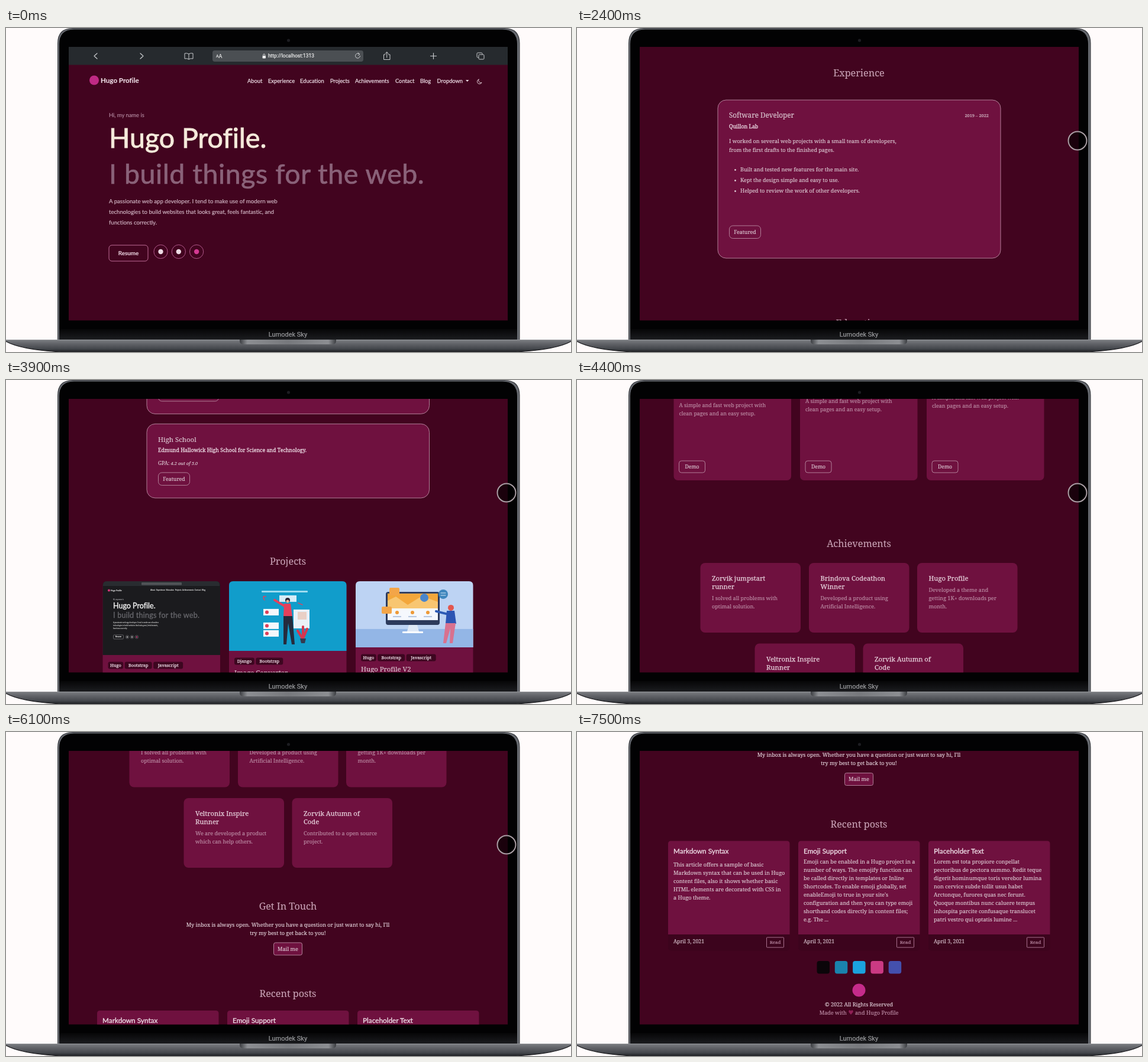
These frames come from a looping animation (955 by 549 pixels, 8400 ms). An HTML page:

```html
<!DOCTYPE html>
<html lang="en">
<head>
<meta charset="utf-8">
<title>Portfolio page on a laptop</title>
<style>
html, body { margin: 0; width: 100%; height: 100%; overflow: hidden; background: #fffbfb; }
svg { display: block; width: 100%; height: 100%; }
text { white-space: pre; font-variant-ligatures: none; }
.serif { font-family: "Noto Serif", serif; }
.sans { font-family: Lato, sans-serif; }
.ui { font-family: Roboto, sans-serif; }
</style>
</head>
<body>
<svg id="stage" viewBox="0 0 955 549" xmlns="http://www.w3.org/2000/svg"></svg>
<script>
const BG = '#42041f', CARD = '#6f113f', EDGE = '#b27f98';
const PALE = '#dccad3', SOFT = '#c6a0b3', MUTED = '#bd8ea6', BRIGHT = '#ecdbe4';

// Markup helpers
const attrs = o => Object.entries(o).map(([k, v]) => ` ${k}="${v}"`).join('');
const rect = (x, y, w, h, fill, r = 0, o = {}) =>
  `<rect x="${x}" y="${y}" width="${w}" height="${h}" rx="${r}" fill="${fill}"${attrs(o)}/>`;
const circle = (x, y, r, fill, o = {}) => `<circle cx="${x}" cy="${y}" r="${r}" fill="${fill}"${attrs(o)}/>`;
const path = (d, fill, o = {}) => `<path d="${d}" fill="${fill}"${attrs(o)}/>`;
const line = (d, color, w = 1) =>
  path(d, 'none', { stroke: color, 'stroke-width': w, 'stroke-linecap': 'round', 'stroke-linejoin': 'round' });
const shift = (y, ...parts) => `<g transform="translate(0 ${y})">${parts.join('')}</g>`;

// y is the optical middle of the text
const firm = (color, w = .3) => ({ stroke: color, 'stroke-width': w });
const text = (x, y, s, size, fill = PALE, o = {}) => {
  const style = { class: 'serif', x, y: (y + size * .35).toFixed(2), 'font-size': size, fill, ...firm(fill, .15), ...o };
  return `<text${attrs(style)}>${s}</text>`;
};
const mid = { 'text-anchor': 'middle' }, end = { 'text-anchor': 'end' };
const lines = (x, y, gap, list, size, fill, o) => list.map((s, i) => text(x, y + i * gap, s, size, fill, o)).join('');
const sans = (x, y, s, size, fill, o = {}) => text(x, y, s, size, fill, { class: 'sans', ...o });
const ui = (x, y, s, size, fill, o = {}) => text(x, y, s, size, fill, { class: 'ui', ...o });
const heading = (y, s) => text(476.5, y, s, 16.2, SOFT, mid);
const bullet = (x, y, s, o) => circle(x - 8.5, y + .5, 1.4, PALE) + text(x, y, s, 9, PALE, o);
const panel = (x, y, w, h, r = 14) => rect(x, y, w, h, CARD, r, { stroke: EDGE });
const button = (x, y, w, h, s, size, r = 6, fill = 'none') =>
  rect(x, y, w, h, fill, r, { stroke: EDGE }) + text(x + w / 2, y + h / 2, s, size, PALE, mid);

function toolbar() {
  const c = '#c9cbce';
  return rect(106, 32, 742, 30.5, '#262a2e') + rect(349, 38, 255, 19, '#4b4f53', 4) +
    line('M154 43l-5 4.5 5 4.5M227 43l5 4.5-5 4.5', c, 1.2) +
    line('M309 44q-3-2-7-1v9q4-1 7 1 3-2 7-1v-9q-4-1-7 1v9', c) +
    ui(355, 48, 'A', 7, '#eee') + ui(359.5, 47.5, 'A', 9, '#eee') +
    rect(433.5, 47, 5.5, 4.5, '#eee', 1) + line('M434.7 47v-1.4a1.5 1.5 0 0 1 3 0v1.4', '#eee', .9) +
    ui(443, 47.5, 'http://localhost:1313', 8.4, '#f2f2f2', firm('#f2f2f2', .2)) +
    line('M597.5 44.5a4 4 0 1 0 1 3M595 42l3 2.4-2.6 2.2', c) +
    line('M641 45h-2.5v8.5h10.5v-8.5h-2.5M643.7 50v-9M641 43.5l2.7-2.7 2.7 2.7', c) +
    line('M717.5 47.5h10M722.5 42.5v10', c, 1.2) +
    rect(796, 42, 9, 8, 'none', 1.5, { stroke: c }) + rect(799, 45, 9, 8, '#262a2e', 1.5, { stroke: c });
}

function hero() {
  const nav = { About: 408, Experience: 443, Education: 497, Projects: 548, Achievements: 590, Contact: 658, Blog: 700, Dropdown: 728.5 };
  const menu = Object.entries(nav).map(([s, x]) => sans(x, 89.5, s, 9.3, BRIGHT, firm(BRIGHT, .25))).join('');
  const social = [BRIGHT, BRIGHT, '#d33a93'].map((c, i) =>
    circle(261.5 + i * 30.3, 379, 11.6, 'none', { stroke: '#b0578a' }) + circle(261.5 + i * 30.3, 379, 4.2, c)).join('');
  return toolbar() + circle(149, 88.5, 8, '#c02a85') +
    sans(160, 88.5, 'Hugo Profile', 11.6, BRIGHT, { 'font-weight': 700 }) + menu +
    path('M777 88h5.5l-2.75 3z', BRIGHT) +
    line('M799 87a4 4 0 1 0 5 5.5a4 4 0 0 1-5-5.5', BRIGHT, .9) +
    sans(174, 147.5, 'Hi, my name is', 9.4, '#b58ca2') +
    sans(174, 187, 'Hugo Profile.', 46.5, '#f5eadb', firm('#f5eadb', .9)) +
    sans(174, 247.5, 'I build things for the web.', 46.5, '#8a6279', { ...firm('#8a6279', .7), 'letter-spacing': .55 }) +
    lines(174, 293.5, 18.2, ['A passionate web app developer. I tend to make use of modern web',
      'technologies to build websites that looks great, feels fantastic, and', 'functions correctly.'],
      9.65, '#cfb3c1', { class: 'sans', ...firm('#cfb3c1', .2) }) +
    rect(174, 368, 66, 27, BG, 5, { stroke: '#c06d98' }) +
    sans(207, 381.5, 'Resume', 9.8, '#e4ccd8', { ...mid, 'font-weight': 700 }) + social;
}

function avatar() {
  return `<clipPath id="face"><circle cx="637" cy="230.5" r="72"/></clipPath>` +
    circle(637, 230.5, 72.3, '#abdce6') + '<g clip-path="url(#face)">' +
    path('M637 191C619 189 613 201 612 212C611 222 602 226 604 236C606 243 599 248 601 257C603 268 612 270 620 271H655C667 271 675 263 674 253C673 246 669 243 671 236C673 226 663 222 662 211C660 197 652 190 637 191Z', '#481b1d') +
    path('M596 305q1-34 18-38l15-6h17l16 6q16 4 17 38z', '#e4233f') +
    path('M628 252h19v17l-9 9-10-9z', '#dba27b') +
    path('M627 275h20l-3 30h-13z', '#fff') +
    path('M629 262l-5 10 8 33h-4l-10-31zM646 262l5 10-7 33h4l9-31z', '#bd1732') +
    path('M637 210q-8 10-15 16q-1 24 15 32z', '#f5c6a0') + path('M637 210q8 10 17 16q0 24-17 32z', '#e3ad86') + '</g>';
}

function about() {
  const tech = ['HTML', 'CSS', 'JavaScript', 'React', 'Node', 'Express'].map((s, i) => {
    const x = i % 2 ? 349 : 227, y = 307 + (i >> 1) * 21.6;
    return path(`M${x - 9} ${y - 1.8}l3.6 2-3.6 2z`, PALE) + text(x, y, s, 9);
  }).join('');
  return heading(116, 'About Me') +
    lines(216, 167, 15.6, ['I am a software developer with a passion for web development. I have a',
      'background in computer science and mathematics, and I have a strong',
      'interest in the intersection of technology and art. I am currently',
      'working as a software developer at <tspan fill="#f3e8ed" stroke="#f3e8ed" stroke-width=".3">quillon lab</tspan>. in San Francisco, CA.'], 9) +
    lines(216, 239.5, 15.8, ['I am currently working on a project that will be used to help people', 'find the best way to get around the city.'], 9) +
    text(216, 280.5, "Here are a few technologies I've been working with recently:", 9) + tech + avatar();
}

function experience() {
  return heading(456, 'Experience') + panel(238, 502, 478, 268) +
    text(257, 528, 'Software Developer', 11.7) + text(696, 528, '2019 – 2022', 7.4, PALE, end) +
    text(257, 547, 'Quillon Lab', 8.8, BRIGHT, firm(BRIGHT)) +
    lines(257, 572, 15, ['I worked on several web projects with a small team of developers,', 'from the first drafts to the finished pages.'], 9) +
    ['Built and tested new features for the main site.', 'Kept the design simple and easy to use.', 'Helped to review the work of other developers.']
      .map((s, i) => bullet(276, 620 + i * 18, s)).join('') +
    button(257.5, 715, 53, 21.5, 'Featured', 8.8) + heading(880, 'Education');
}

const gpa = (y, n) => text(257, y, `GPA: <tspan font-size="7.7" font-style="italic">${n} out of 5.0</tspan>`, 8.5);
const school = (y, title, place, dates) => text(257, y, title, 11.7) +
  text(257, y + 19, place, 8.8, BRIGHT, firm(BRIGHT)) + text(696, y + 1, dates, 7.5, PALE, end);
const extras = y => text(257, y, 'Extracurricular Activities', 8.7) +
  bullet(276, y + 23.5, 'Lorem ipsum dolor sit amet consectetur adipisicing elit.') +
  bullet(276, y + 37.5, 'Tempora esse, eaque delectus nulla quo doloribus itaque expedita alias natus optio totam') +
  text(276, y + 51, 'maxime nihil excepturi velit a animi laborum hic similique.', 9);

function education() {
  return panel(238, 64.5, 477.5, 172.5) +
    school(90, 'Master of Business Administration', 'University of California, Berkeley', '2013 – 2015') +
    gpa(130, '3.8') + extras(148.5) +
    panel(238, 254, 477.5, 259.5) +
    school(280.5, 'Bachelor of Science in Computer Science', 'Massachusetts Institute of Technology', '2009 – 2013') +
    gpa(321, '3.9') +
    text(257, 338.5, 'I Publiced two papers in the DRN LUMVIA Conference on Artificial Intelligence.', 8.8) +
    bullet(276, 361.5, 'Calm and Thorough Animal Recognition with a Double Interlocking Neural Lattice', { 'text-decoration': 'underline' }) +
    bullet(276, 375.5, 'Face mask detection using a single convolutional neural network.') +
    extras(398.5) + button(257.5, 471, 102, 21, 'My academic record', 8.8);
}

function tags(x, y, list) {
  return list.map(s => {
    const w = s.length * 4.05 + 9.5, out = rect(x, y - 6, w, 12, '#3d0620', 3) +
      text(x + w / 2, y, s, 7.3, BRIGHT, { ...mid, ...firm(BRIGHT, .25) });
    x += w + 2.5;
    return out;
  }).join('');
}

function project(x, h, art, list, title) {
  const y = 341 + h;
  return rect(x, 341, 198.5, 312, CARD, 7) + art + tags(x + 9, y + 17.5, list) + text(x + 9, y + 37.5, title, 11.3) +
    lines(x + 9, y + 60, 14, ['A simple and fast web project with', 'clean pages and an easy setup.'], 8.9, MUTED) +
    button(x + 9, 620, 44, 20, 'Demo', 8.6, 4);
}
const cover = (x, h, c) => path(`M${x} ${341 + h}v-${h - 7}q0-7 7-7h184.5q7 0 7 7v${h - 7}z`, c);

function artDark() {
  const g = '#8b8b8f';
  return cover(163.5, 125, '#1b1b1e') + path('M164 349v-2q0-6 7-6h184q6 0 6 6v2z', '#292c30') +
    rect(229, 343, 68, 4.5, '#505357', 1) + circle(174, 356.5, 2, '#d33a7a') +
    sans(177, 356.5, 'Hugo Profile', 3.4, '#ddd') +
    sans(244, 356.5, 'About  Experience  Education  Projects  Achievements  Contact  Blog', 3.1, '#ccc') +
    sans(181, 372, 'Hi, my name is', 2.8, g) + sans(181, 383, 'Hugo Profile.', 12.5, '#f2f2f2', firm('#f2f2f2', .4)) +
    sans(181, 399, 'I build things for the web.', 12.5, '#68686d', { ...firm('#68686d'), 'letter-spacing': .25 }) +
    lines(181, 411, 5, ['A passionate web app developer. I tend to make use of modern', 'technologies to build websites that looks great, feels fantastic,', 'functions correctly.'], 2.6, '#aaa') +
    rect(181.5, 432, 17, 7, 'none', 1.5, { stroke: g, 'stroke-width': .6 }) + sans(190, 435.5, 'Resume', 3, '#ddd', mid) +
    ['#bbb', '#bbb', '#d33a7a'].map((c, i) => circle(205 + i * 8, 435.5, 2.7, 'none', firm(g, .5)) + circle(205 + i * 8, 435.5, 1.2, c)).join('');
}

function artBlue() {
  const box = y => rect(435, y, 26, 11, '#f4f7fb') + circle(441, y + 5.5, 3, '#e0405a');
  return cover(377, 118, '#119dcb') + rect(432, 357, 78, 3, '#9ddcf0', 1) +
    rect(462, 365, 29, 11, '#d5ecf7') + rect(486, 389, 27, 32, '#eaf1f8') + rect(493, 393, 15, 13, '#e9cfc5') +
    [388, 411, 424].map(box).join('') +
    line('M472 384L454 373', '#e5405b', 4) + circle(476, 373, 4, '#2a2333') + circle(476, 375, 2.5, '#f1b89b') +
    path('M470 379h11l3 22h-15z', '#e5405b') + path('M469 400h15l4 48h-5l-6-36-3 36h-5z', '#252b3d') +
    line('M501 438l-8-13M502 438l7-16M502 438v-20', '#d5364f', 4) + path('M497 438h10l-2 8h-6z', '#333a50') +
    line('M437 373q-5-8 2-6M494 378l7 3', '#e5405b', 1.5);
}

function artLight() {
  return cover(591, 112, '#bdd3f3') + rect(591, 422, 198.5, 31, '#93b6e6') +
    rect(642, 359, 91, 56, '#2c3a5c', 4) + rect(645, 362, 85, 45, '#f5f8fd') + rect(645, 362, 85, 25, '#f3a73b') +
    path('M645 387v-13l14-7 20 14 24-15 27 10v11z', '#f8c671') +
    [661, 687, 713].map(x => circle(x, 394, 3, '#ee9a37') + rect(x - 7, 400, 14, 2, '#b3c5df')).join('') +
    path('M681 415h14l3 11h-20z', '#dfe8f5') + rect(670, 426, 35, 3, '#fff', 1) +
    rect(648, 352, 17, 13, '#f3a548', 2) + rect(635, 384, 17, 12, '#f3a548', 2) +
    circle(739, 363, 8, '#3f86bd') + line('M735 361h8M735 365h8', '#d6e9f6') + circle(707, 369, 7, '#4a86cc') +
    line('M747 397l-20-5', '#2d5bb5', 4) + circle(752, 386, 5, '#e2574f') + path('M745 391h13l3 22h-18z', '#2c54b3') +
    path('M743 412h17l-5 34h-5l1-25-7 25h-5z', '#d8718f');
}

function projects() {
  return panel(238, 74.5, 477.5, 125.5) + text(257, 101, 'High School', 11.4) +
    text(257, 119.5, 'Edmund Hallowick High School for Science and Technology.', 8.8, BRIGHT, firm(BRIGHT)) +
    gpa(141, '4.2') + button(257.5, 157, 53, 21.5, 'Featured', 8.8) + heading(307, 'Projects') +
    project(163.5, 125, artDark(), ['Hugo', 'Bootstrap', 'Javascript'], 'Hugo Profile') +
    project(377, 118, artBlue(), ['Django', 'Bootstrap'], 'Image Converter') +
    project(591, 112, artLight(), ['Hugo', 'Bootstrap', 'Javascript'], 'Hugo Profile V2');
}

function award(x, y, title, body) {
  const top = y + 12.5 + title.length * 14;
  return rect(x, y, 169.5, 118, CARD, 8) + lines(x + 19.5, y + 26.5, 14, title, 11.2, '#e6d0db', firm('#e6d0db', .25)) +
    lines(x + 19.5, top + 19, 14, body, 9, MUTED);
}

function achievements() {
  return heading(100, 'Achievements') +
    award(208.5, 133, ['Zorvik jumpstart', 'runner'], ['I solved all problems with', 'optimal solution.']) +
    award(392, 133, ['Brindova Codeathon', 'Winner'], ['Developed a product using', 'Artificial Intelligence.']) +
    award(575, 133, ['Hugo Profile'], ['Developed a theme and', 'getting 1K+ downloads per', 'month.']) +
    award(300.5, 269.5, ['Veltronix Inspire', 'Runner'], ['We are developed a product', 'which can help others.']) +
    award(483.5, 269.5, ['Zorvik Autumn of', 'Code'], ['Contributed to a open source', 'project.']);
}

function contact() {
  return heading(295, 'Get In Touch') +
    lines(476.5, 326.5, 14, ["My inbox is always open. Whether you have a question or just want to say hi, I'll", 'try my best to get back to you!'], 9, '#e2d3da', mid) +
    button(452.5, 357, 48, 21, 'Mail me', 9, 3, CARD);
}

function post(x, title, y, body) {
  return rect(x, 184.5, 205.5, 186, '#3c041d', 5) + path(`M${x} 343v-153.5q0-5 5-5h195.5q5 0 5 5v153.5z`, CARD) +
    sans(x + 9, 201.5, title, 11.8, BRIGHT, firm(BRIGHT, .35)) + lines(x + 9, y, 14, body, 9.1) +
    text(x + 9, 354.5, 'April 3, 2021', 8.7) +
    rect(x + 166.5, 348, 29, 17, 'none', 1, { stroke: '#a8718d' }) + text(x + 181, 356.5, 'Read', 7.9, MUTED, mid);
}

function posts() {
  const icons = ['#0b0509', '#1a83ad', '#1ba2de', '#cb3a83', '#4450ae']
    .map((c, i) => rect(405.5 + i * 30.3, 388, 21.5, 21.5, c, 4)).join('');
  const heart = '<tspan font-family="DejaVu Sans, sans-serif" font-size="10.5" fill="#8f1f55" stroke="none">♥</tspan>';
  return heading(156, 'Recent posts') +
    post(154, 'Markdown Syntax', 224.5, ['This article offers a sample of basic', 'Markdown syntax that can be used in Hugo',
      'content files, also it shows whether basic', 'HTML elements are decorated with CSS in', 'a Hugo theme.']) +
    post(374, 'Emoji Support', 219.5, ['Emoji can be enabled in a Hugo project in a', 'number of ways. The emojify function can',
      'be called directly in templates or Inline', 'Shortcodes. To enable emoji globally, set', "enableEmoji to true in your site's",
      'configuration and then you can type emoji', 'shorthand codes directly in content files;', 'e.g. The ...']) +
    post(594, 'Placeholder Text', 219.5, ['Lorem est tota propiore conpellat', 'pectoribus de pectora summo. Redit teque',
      'digerit hominumque toris verebor lumina', 'non cervice subde tollit usus habet', 'Arctonque, furores quas nec ferunt.',
      'Quoque montibus nunc caluere tempus', 'inhospita parcite confusaque translucet', 'patri vestro qui optatis lumine ...']) +
    icons + circle(476.5, 437.5, 11, '#c52b8a') +
    text(476.5, 461.5, '© 2022 All Rights Reserved', 9, '#e2d3da', mid) +
    text(476.5, 475.5, `Made with ${heart} and Hugo Profile`, 9.1, MUTED, mid);
}

const gradient = (id, dir, stops) => `<linearGradient id="${id}" ${dir}>` +
  stops.map(([at, c]) => `<stop offset="${at}" stop-color="${c}"/>`).join('') + '</linearGradient>';
const defs = '<defs><clipPath id="screen"><rect x="106" y="32" width="742" height="463.5"/></clipPath>' +
  gradient('base', 'x2="0" y2="1"', [[0, '#7d7f83'], [.3, '#64666b'], [.75, '#43464b'], [1, '#1d1f22']]) +
  gradient('chin', 'x2="0" y2="1"', [[0, '#060607'], [1, '#1b1c1f']]) +
  gradient('notch', '', [[0, '#3b3d41'], [.08, '#8c8e92'], [.5, '#77797d'], [.92, '#8c8e92'], [1, '#3b3d41']]) + '</defs>';

// Lid outline, inset from the outer edge
const lid = (left, top, right, r, fill) =>
  path(`M${left} 528V${top + r}Q${left} ${top} ${left + r} ${top}H${right - r}Q${right} ${top} ${right} ${top + r}V528Z`, fill);
const shell = lid(87, 0, 868.5, 26, '#34363b') + lid(88, 1, 867.5, 25.5, '#676a70') + lid(90, 2.5, 864, 25, '#020203') +
  rect(90, 510, 774, 18, 'url(#chin)') + circle(477.5, 21, 2.6, '#1d1d22') +
  ui(476.5, 519.5, 'Lumodek Sky', 11, '#9b9c9f', { ...mid, ...firm('#9b9c9f', .2) });
const foot = path('M0 528H955V531Q930 545 862 549H93Q25 545 0 531Z', 'url(#base)') +
  line('M0 531Q25 545 93 549M955 531Q930 545 862 549', '#1c1d20', 1.2) +
  rect(0, 528, 955, 1, '#94969a') + path('M395 528H558V530Q558 536 551 536H402Q395 536 395 530Z', 'url(#notch)');

const stage = document.getElementById('stage');
stage.innerHTML = defs + shell + `<g clip-path="url(#screen)">${rect(106, 32, 742, 464, BG)}<g id="page">` +
  hero() + shift(484, about(), experience()) + shift(1344, education()) + shift(1800, projects()) +
  shift(2460, achievements()) + shift(2617.5, contact()) + shift(2905, posts()) + '</g></g>' + foot +
  `<g id="pointer">${circle(846, 191, 15.5, '#000', { 'fill-opacity': .6, stroke: '#ab9fa5', 'stroke-width': 2 })}</g>`;
const page = document.getElementById('page'), pointer = document.getElementById('pointer');

// Each scroll: first step, last step, distance
const LOOP = 8400, STEP = 100;
const scrolls = [[800, 1300, 484], [1900, 2200, 380], [2600, 2700, 180], [2900, 3100, 300], [3600, 4000, 509],
  [4200, 4400, 430], [5000, 5100, 177], [5900, 6100, 157.5], [6300, 6700, 287.5]];
const progress = (t, a, b) => Math.min(1, Math.max(0, (t - a + STEP) / (b - a + STEP)));
const ease = p => p * p * (3 - 2 * p);

function draw(now) {
  const t = Math.floor(now % LOOP / STEP) * STEP;
  const y = scrolls.reduce((sum, [a, b, d]) => sum + d * ease(progress(t, a, b)), 0);
  page.setAttribute('transform', `translate(0 ${-y.toFixed(1)})`);
  pointer.setAttribute('opacity', progress(t, 300, 500) - progress(t, 7400, 7500));
}
function tick() {
  draw(performance.now());
  requestAnimationFrame(tick);
}
tick();
</script>
</body>
</html>
```
